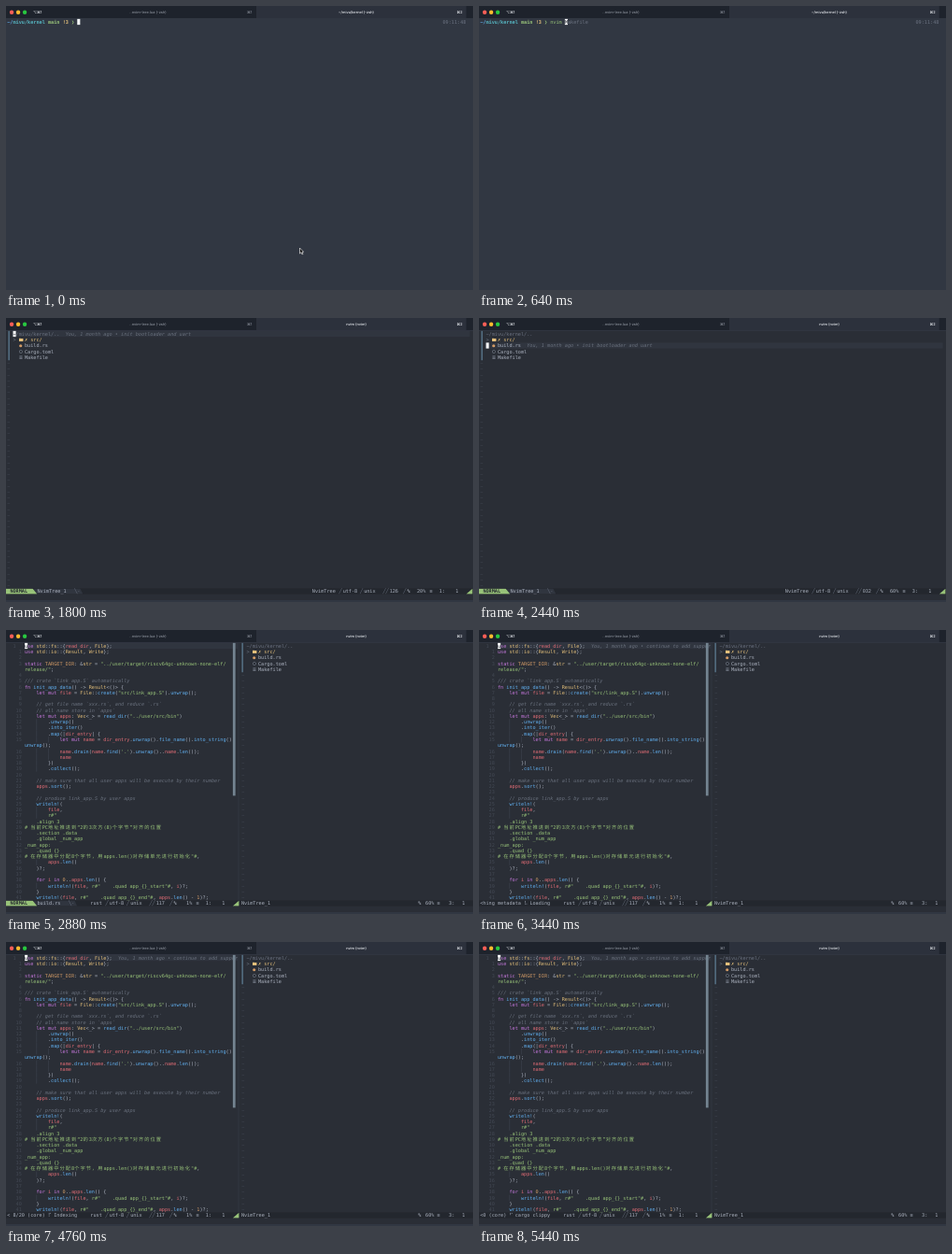
An HTML page that plays this animation: 500 px wide and 304 px high, repeating every 5.48 s.

```html
<!DOCTYPE html>
<html lang="en">
<head>
<meta charset="utf-8">
<title>Terminal session</title>
<style>
  html, body { margin: 0; width: 100%; height: 100%; overflow: hidden; background: #313742; }
  /* Drawn at 8x, so one terminal cell is about 25 by 50 units. */
  #stage {
    position: absolute; left: 0; top: 0; width: 4000px; height: 2432px; overflow: hidden;
    transform: scale(.125); transform-origin: 0 0; text-rendering: geometricPrecision;
  }
  #bar { position: absolute; width: 4000px; height: 104px; background: #1e232c;
    font: 500 31px/106px Inter, sans-serif; color: #8b919b; }
  #bar * { position: absolute; white-space: pre; }
  .light { width: 35px; height: 35px; top: 36px; border-radius: 50%; }
  .tab { left: 2138px; width: 1800px; height: 104px; background: #2c313c; border-left: 4px solid #14181f; }
  .name { width: 800px; text-align: center; }
  .key { font-family: Inter, "DejaVu Sans", sans-serif; }
  #title, .on { color: #eceff4; }
  #term { position: absolute; left: 10px; top: 111px; color: #abb2bf;
    font: 41.5px/50.1px "DejaVu Sans Mono", monospace; }
  #term > * { position: absolute; white-space: pre; }
  .cjk { font: 42px/0 "Noto Sans CJK SC", "Noto Sans CJK", sans-serif; letter-spacing: 8px; }
  .cm { color: #69707d; font-style: italic; }
  .st { color: #98c379; }
  .kw { color: #c678dd; }
  .ty { color: #e5c07b; }
  .fu { color: #61afef; }
  .nu { color: #d19a66; }
  .vr { color: #e06c75; }
  .cy { color: #56b6c2; }
  .dim { color: #6b7280; }
  .faint { color: #434954; }
  .ink { color: #22262d; }
  .b { font-weight: 700; }
  #mouse { position: absolute; left: 2512px; top: 2068px; }
</style>
</head>
<body>
<div id="stage">
  <div id="bar">
    <i class="light" style="left:31px;background:#fe5f57"></i>
    <i class="light" style="left:87px;background:#febc2e"></i>
    <i class="light" style="left:143px;background:#28c840"></i>
    <span class="key on" style="left:232px">⌥⌘1</span>
    <span class="name" style="left:816px">..nvim-tree.lua (-zsh)</span>
    <span class="key" style="left:2064px">⌘1</span>
    <i class="tab"></i>
    <span class="name" id="title" style="left:2600px"></span>
    <span class="key on" style="left:3860px">⌘2</span>
  </div>
  <div id="term"></div>
  <svg id="mouse" width="40" height="64" viewBox="0 0 10 16">
    <path d="M1 1V13L4 10.3 6 15 8 14 6 9.6H9.4Z" fill="#111" stroke="#fff" stroke-width="1.2"/>
  </svg>
</div>

<script type="text/plain" id="code">use std::fs::{read_dir, File};
use std::io::{Result, Write};

static TARGET_DIR: &str = "../user/target/riscv64gc-unknown-none-elf/
release/";

/// crate `link_app.S` automatically
fn init_app_data() -> Result<()> {
    let mut file = File::create("src/link_app.S").unwrap();

    // get file name `xxx.rs`, and reduce `.rs`
    // all name store in `apps`
    let mut apps: Vec<_> = read_dir("../user/src/bin")
        .unwrap()
        .into_iter()
        .map(|dir_entry| {
            let mut name = dir_entry.unwrap().file_name().into_string().
unwrap();
            name.drain(name.find('.').unwrap()..name.len());
            name
        })
        .collect();

    // make sure that all user apps will be execute by their number
    apps.sort();

    // produce link_app.S by user apps
    writeln!(
        file,
        r#"
    .align 3
# 当前PC地址推进到“2的3次方(8)个字节”对齐的位置
    .section .data
    .global _num_app
_num_app:
    .quad {}
# 在存储器中分配8个字节，用apps.len()对存储单元进行初始化"#,
        apps.len()
    )?;

    for i in 0..apps.len() {
        writeln!(file, r#"    .quad app_{}_start"#, i)?;
    }
    writeln!(file, r#"    .quad app_{}_end"#, apps.len() - 1)?;</script>

<script>
const LOOP = 5480, ROWS = 44, BAR = 44, CELL = 25, ROW = 50.1;
const GREEN = '#98c379', WHITE = '#f4f6f8', BG = '#2a2e36', LINE = '#30353f', STATUS = '#23272e';
const DIR = '~/mivu/kernel';
const KEYS = [320, 400, 480, 560, 640, 840];
const SPIN = '⠋⠙⠹⠸⠼⠴⠦⠧⠇⠏';
const term = document.getElementById('term');
const title = document.getElementById('title');
const mouse = document.getElementById('mouse');

const esc = s => s.replace(/&/g, '&amp;').replace(/</g, '&lt;');
const at = (col, row) => `left:${col * CELL}px;top:${row * ROW}px`;
const text = (col, row, s, cls = '') => `<span class="${cls}" style="${at(col, row)}">${esc(s)}</span>`;
const box = (col, row, w, h, color, more = '') =>
  `<i style="${at(col, row)};width:${w * CELL}px;height:${h * ROW}px;background:${color};${more}"></i>`;
const cursor = (col, row, ch = '') => box(col, row, 1, 1, WHITE) + text(col, row, ch, 'ink');
const slant = pts => `clip-path:polygon(${pts})`;

function highlight(src) {
  const kinds = ['cm', 'st', 'kw', 'ty', 'fu', 'nu', 'vr'];
  const rule = /(\/\/.*)|(r#"[\s\S]*?"#|"[^"]*"|'.')|\b(use|static|fn|let|mut|for|in)\b|\b(\w+(?=::)|str\b|[A-Z]\w*[a-z]\w*)|(\w+!?(?=\())|\b([A-Z_]{3,}|\d+)\b|\b([a-z]\w*)/g;
  let out = '', last = 0;
  for (const m of src.matchAll(rule)) {
    const kind = kinds[m.slice(1).findIndex(Boolean)];
    out += esc(src.slice(last, m.index)) + `<span class="${kind}">${esc(m[0])}</span>`;
    last = m.index + m[0].length;
  }
  out += esc(src.slice(last));
  return out.replace(/[\u3000-\u9fff\uff00-\uffef]+/g, '<span class="cjk" lang="zh-CN">$&</span>');
}

// Relative numbers; a wrapped row has none.
function numbers() {
  let n = 0;
  return Array.from({ length: ROWS }, (_, r) => {
    if (r === 4 || r === 17) return '';
    return n++ ? String(n - 1).padStart(3) : '1';
  }).join('\n');
}

// Thin indent guides left of nested lines.
function guides(src) {
  let out = '';
  src.split('\n').forEach((line, row) => {
    for (let c = 4; c < line.search(/\S/); c += 4) out += box(c + 6, row, .2, 1, '#3d434e');
  });
  return out;
}

const raw = document.getElementById('code').textContent;
const source = guides(raw) + `<span style="${at(6, 0)}">${highlight(raw)}</span>`;
const gutter = numbers();
const tildes = (col, from) => text(col, from, '~\n'.repeat(ROWS - from), 'faint');
const canvas = () => box(-.4, 0, 160, 46, BG) + box(-.4, BAR, 160, 1, STATUS);

function statusRight(shift, ft, code, pct, line) {
  const put = (col, s, cls) => text(col - shift, BAR, s, cls);
  return put(112.5 - ft.length, ft) + put(113.7, '╱', 'dim') + put(115, 'utf-8') +
    put(120.9, '╱', 'dim') + put(122.2, 'unix') + put(128.7, '╱╱', 'dim') + put(131, code) +
    put(135.7, '╱', 'dim') + put(137, '%', 'b') + put(139.4, pct.padStart(4)) + put(144.7, '≡') +
    put(148, line + ':') + put(153.6, '1') +
    box(157.2 - shift, BAR, 2.3, 1, GREEN, slant('100% 0,100% 100%,0 100%'));
}

function statusLeft(name) {
  const end = name ? 12 + name.length + 4 : 13.5;
  return box(9, BAR, end - 9, 1, LINE, slant('0 0,94% 0,100% 100%,0 100%')) +
    box(-.4, BAR, 10.7, 1, GREEN, slant('0 0,85% 0,100% 100%,0 100%')) +
    text(1, BAR, 'NORMAL', 'ink b') + text(10.3, BAR, name) + text(end - 3, BAR, '╲-', 'dim');
}

function tree(col, line, blame, active) {
  const files = ['build.rs', 'Cargo.toml', 'Makefile'];
  const ends = [16, 10, 12];
  let out = (active ? box(2, line - 1, 156.5, 1, LINE) : '') +
    box(col - 1.6, 0, .4, 5, '#5f7f95') +
    text(col, 0, DIR + '/..', 'dim') + text(col, 1, '>', 'dim') +
    box(col + 2, 1.2, 1.6, .6, '#e5c07b', slant('0 0,40% 0,50% 15%,100% 15%,100% 100%,0 100%')) +
    text(col + 4, 1, '✗', 'ty') + text(col + 6, 1, 'src/', 'ty');
  files.forEach((f, i) => out += text(col + 4, i + 2, f));
  out += box(col + 2.1, 2.28, 1, .48, '#d19a66', 'border-radius:50%') +
    box(col + 2.1, 3.25, .8, .4, 'none', 'border:4px solid #8b93a1;border-radius:50%') +
    [.28, .48, .68].map(y => box(col + 2.2, 4 + y, 1, .09, '#8b93a1')).join('');
  if (blame) out += text(col + ends[line - 1] + 2, line - 1, 'You, 1 month ago • init bootloader and uart', 'cm');
  if (active) out += cursor(col, line - 1, line === 1 ? '~' : '');
  return out;
}

function shell(t) {
  const typed = 'nvim .'.slice(0, KEYS.filter(k => k <= t).length);
  const hint = 'nvim Makefile';
  const rest = typed && hint.startsWith(typed) ? hint.slice(typed.length) : '';
  const col = 24 + typed.length;
  return text(0, 0, '~/', 'fu b') + text(2, 0, DIR.slice(2), 'cy b') + text(14, 0, 'main', 'st b') +
    text(19, 0, '!3', 'ty b') + text(22, 0, '❯', 'st b') +
    text(24, 0, typed, typed.length < 4 ? 'nu' : 'st') + text(col, 0, rest, 'dim') +
    (t < 1080 ? cursor(col, 0, rest[0]) : '') + text(149.2, 0, '09:11:48', 'dim');
}

function emptyBuffer() {
  return canvas() + box(6, 0, 152, 1, LINE) + text(2, 0, '1') + tildes(0, 1) +
    statusLeft('') + statusRight(0, 'no ft', '000', '100%', 1);
}

function browser(t) {
  const line = t < 2160 ? 1 : t < 2320 ? 2 : 3;
  const blame = t >= [1320, 2240, 2440][line - 1];
  return canvas() + tree(2, line, blame, true) + tildes(0, 5) + statusLeft('NvimTree_1') +
    statusRight(0, 'NvimTree', line === 1 ? '126' : '032', line * 20 + '%', line);
}

// The language server's message keeps only its tail.
function progress(t) {
  const spin = SPIN[Math.floor(t / 60) % SPIN.length];
  const done = Math.min(20, 1 + Math.floor((t - 4560) / 26));
  const [left, right] = t < 4560 ? ['Fetching metadata', 'Loading']
    : t < 5080 ? [`Indexing ${done}/20 (core)`, 'Indexing'] : ['20/20 (core)', 'cargo clippy'];
  const head = '<' + left.slice(right.length - 20);
  return text(0, BAR, head) + text(head.length + 1, BAR, spin) + text(head.length + 3, BAR, right);
}

function editor(t) {
  const note = t >= 3200 ? text(38, 0, 'You, 1 month ago • continue to add suppor', 'cm') : '';
  return canvas() + box(6, 0, 73, 1, LINE) + text(2, 0, gutter, 'faint') +
    source + note + cursor(6, 0, 'u') +
    box(77.3, 0, .9, 26.1, '#748491') + box(79.2, 0, .16, 44, '#3a404b') +
    tree(82, 3, false, false) + tildes(80.3, 5) +
    (t < 3440 ? statusLeft('build.rs') : progress(t)) + statusRight(80, 'rust', '117', '1%', 1) +
    text(80.2, BAR, 'NvimTree_1') + text(140.8, BAR, '%', 'b') + text(143.3, BAR, '60%') +
    text(147.3, BAR, '≡') + text(151.3, BAR, '3:') + text(155.8, BAR, '1');
}

function scene(t) {
  if (t < 1160) return shell(t);
  if (t < 1200) return canvas();
  if (t < 1280) return emptyBuffer();
  return t < 2880 ? browser(t) : editor(t);
}

let shown;
function draw(now) {
  const t = now % LOOP;
  const html = scene(t);
  if (html !== shown) term.innerHTML = shown = html;
  title.textContent = t < 1080 ? DIR + ' (-zsh)' : t < 1800 ? 'nvim (-zsh)' : 'nvim (nvim)';
  mouse.style.display = t < 320 ? '' : 'none';
  requestAnimationFrame(draw);
}
draw(performance.now());
</script>
</body>
</html>
```
